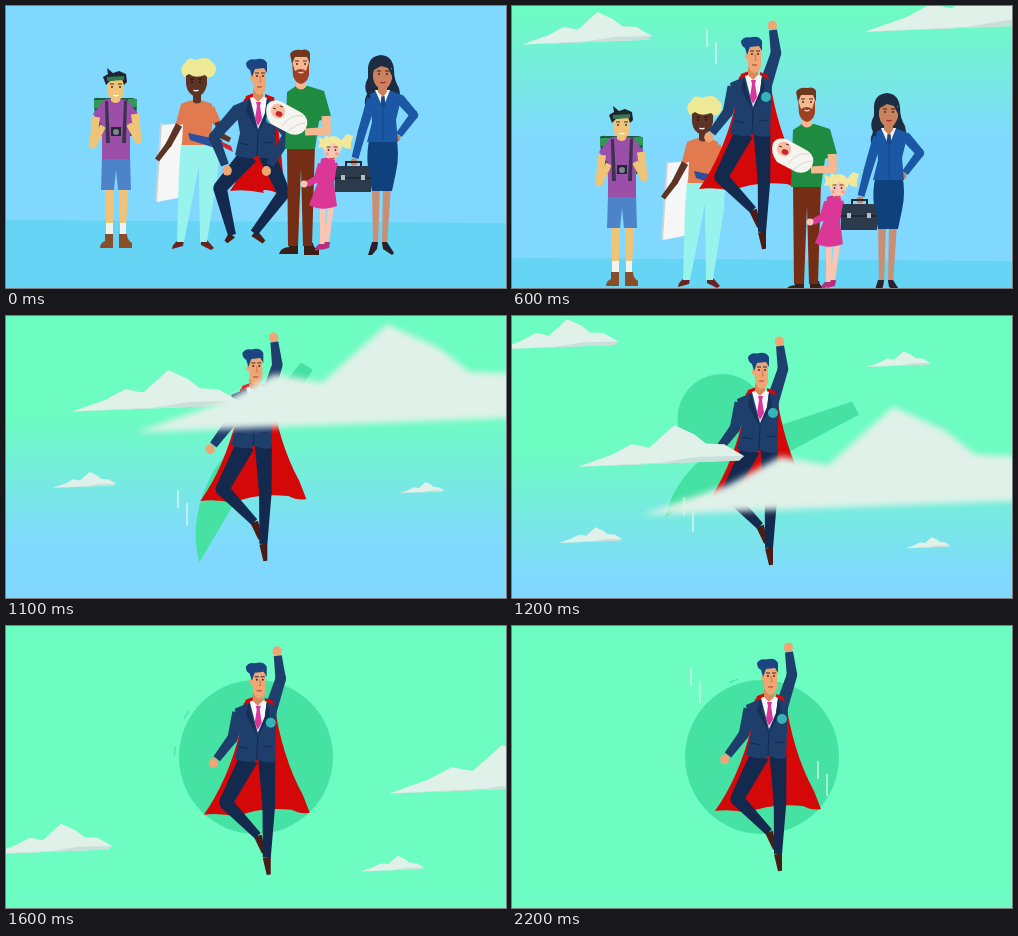
An HTML page with a canvas that plays this animation: 500 px wide and 282 px high, repeating every 2300 ms.

```html
<!DOCTYPE html>
<html lang="en">
<head>
<meta charset="utf-8">
<title>Flying hero</title>
<style>
html, body { margin: 0; width: 100%; height: 100%; overflow: hidden; background: #80d8ff; }
canvas { display: block; width: 500px; height: 282px; }
</style>
</head>
<body>
<canvas id="stage"></canvas>
<script>
const LOOP = 2300, STEP = 100, W = 500, H = 282;
const canvas = document.getElementById('stage');
const ratio = window.devicePixelRatio || 1;
canvas.width = W * ratio;
canvas.height = H * ratio;
const ctx = canvas.getContext('2d');

// ---- motion rules ----
const LAUNCH = 600, END = 2200;
const mix = (a, b, k) => a + (b - a) * k;
const mixPoint = (p, q, k) => [mix(p[0], q[0], k), mix(p[1], q[1], k)];
const clamp = k => Math.max(0, Math.min(1, k));
const smooth = k => (k = clamp(k), k * k * (3 - 2 * k));

// The flight starts fast and slows to a hover.
const climb = t => 735 * (1 - Math.pow((END - t) / (END - LAUNCH), 1.45));
const crowdDrop = t => 38 * Math.pow(t / LAUNCH, 4.7);
function skyTop(t) {
  const u = (t - LAUNCH) / 800;
  return 5 + 205 * Math.sign(u) * Math.pow(Math.abs(u), 1.6);
}

// ---- drawing helpers ----
function fill(color, d) {
  ctx.fillStyle = color;
  ctx.fill(new Path2D(d));
}
function line(color, width, d) {
  ctx.strokeStyle = color;
  ctx.lineWidth = width;
  ctx.stroke(new Path2D(d));
}
function oval(color, x, y, rx, ry = rx, turn = 0) {
  ctx.fillStyle = color;
  ctx.beginPath();
  ctx.ellipse(x, y, rx, ry, turn, 0, 7);
  ctx.fill();
}
const poly = (color, pts) => fill(color, 'M' + pts.map(p => p.join()).join('L') + 'Z');

// Limb through joints, its width tapering from start to end.
function limb(color, joints, from, to) {
  const last = joints.length - 1;
  const width = i => mix(from, to, i / last) / 2;
  for (let i = 0; i < last; i++) {
    const [x0, y0] = joints[i], [x1, y1] = joints[i + 1];
    const len = Math.hypot(x1 - x0, y1 - y0) || 1;
    const nx = (y0 - y1) / len, ny = (x1 - x0) / len;
    const a = width(i), b = width(i + 1);
    poly(color, [[x0 + nx * a, y0 + ny * a], [x1 + nx * b, y1 + ny * b],
      [x1 - nx * b, y1 - ny * b], [x0 - nx * a, y0 - ny * a]]);
    if (i + 1 < last) oval(color, x1, y1, b);
  }
}
function face(x, y, gap, ink, lips) {
  for (const eye of [x - gap, x + gap]) {
    oval(ink, eye, y, .9);
    line(ink, .9, `M${eye - 2} ${y - 3}h4`);
  }
  line(lips, 1.4, `M${x - 2.5} ${y + 8}q2.5 1.8 5 0`);
}

// ---- sky ----
function sky(t) {
  const y = skyTop(t);
  const g = ctx.createLinearGradient(0, y, 0, y + 130);
  g.addColorStop(0, '#6dfcc2');
  g.addColorStop(1, '#80d8ff');
  ctx.fillStyle = g;
  ctx.fillRect(0, 0, W, H);
}

const ridge = [[0, 1], [.2, .72], [.32, .46], [.43, .54], [.58, 0], [.7, .22], [.77, .44], [.88, .46], [1, .74], [.97, .85]];
const shade = [[0, 1], [.5, .9], [.72, .76], [1, .74], [.97, .85]];
// left, width, top at launch
const farClouds = [[10, 130, 6], [353, 203, -25], [47, 63, -152], [394, 44, -142],
  [-15, 121, -360], [355, 63, -328], [383, 195, -439]];
const nearCloud = [66, 166, -254];
const haze = [130, 433, -454];

function cloud([x, w, y], t, depth = 1) {
  const top = y + climb(t) * depth;
  const place = pts => pts.map(([u, v]) => [x + u * w, top + v * w / 4]);
  poly('#e0f1e9', place(ridge));
  if (depth === 1) poly('#cadfda', place(shade));
}

function streaks(x, y, born, t) {
  const age = t - born;
  if (age < 0 || age > 400) return;
  ctx.fillStyle = 'rgba(225,255,245,.8)';
  ctx.fillRect(x - .75, y + age * .07, 1.5, 18);
  ctx.fillRect(x + 8.25, y + 13 + age * .07, 1.5, 22);
}

// ---- green disc: a spinning segment that a circle grows over ----
function disc(t) {
  const green = '#46e2a4';
  if (t > 800 && t < 1600) {
    const a = 112 * Math.cos((t - 1100) / 500);
    const w = 28 + (t - 900) * .03;
    ctx.save();
    ctx.translate(250, 150);
    ctx.rotate((57 + (t - 900) * .317) * Math.PI / 180);
    fill(green, `M${-a} 0H${a}Q${a * .7} ${w} ${a * .2} ${w}L${-a} ${w * .4}Z`);
    ctx.restore();
  }
  const grow = clamp((t - 1100) / 300);
  oval(green, mix(190, 250, grow), mix(88, 131, grow), 77 * Math.sqrt(grow));
  if (t < 1500) return;
  ctx.strokeStyle = green;
  ctx.lineWidth = 1.2;
  const turn = 3.54 + (t - 1800) * .0019;
  for (const a of [turn, turn + .47]) {
    ctx.beginPath();
    ctx.arc(250, 131, 81.5, a, a + .11 * clamp((2200 - t) / 300 + (a === turn)));
    ctx.stroke();
  }
}

// ---- bystanders ----
function backpacker() {
  const skin = '#f0c478';
  fill('#1d5a44', 'M88 95Q87 91 93 92H126Q132 92 131 98L129 130H90Z');
  fill('#2f9a58', 'M88 94h10v8h-10zM122 93h9v8h-9z');
  fill(skin, 'M99 182h9l-1 40h-7zM113 182h9l-2 40h-6z');
  fill('#f4f4ee', 'M100 217h7v13h-7zM114 217h6v13h-6z');
  fill('#8a4f2a', 'M99 228h8v14h-13q0-5 5-7zM113 228h8q0 6 5 9v5h-13z');
  fill('#4d84c9', 'M96 150H124L125 184H112L110 164L108 184H95Z');
  fill('#9b4fa9', 'M98 94Q109 90 122 95L132 108L124 118V153H96V119L87 108Z');
  limb(skin, [[90, 111], [87, 139], [97, 120]], 8, 6);
  limb(skin, [[129, 108], [132, 134], [123, 118]], 8, 6);
  fill('#3c3150', 'M99 95h3l2 42h-4zM118 95h3l-1 42h-4z');
  fill('#222733', 'M105 121h10v9h-10z');
  oval('#7c8793', 110, 126, 3);
  fill(skin, 'M105 86h9v9q-4 4-9 0zM101 73H118V85Q117 94 110 95Q102 93 101 84Z');
  fill('#1f2430', 'M100 79L97 71L102 68L101 62L107 67L113 65L120 68L121 76L118 79L116 73L104 75Z');
  fill('#2f7a50', 'M101 71l17-1v4l-17 1z');
  face(110, 81, 4, '#222', '#fff');
}

function boardWoman() {
  const skin = '#5b3426';
  fill('#c9d4d8', 'M154 118l3-1l-3 77l-5 2z');
  fill('#f5f6f5', 'M156 119L187 116V189L151 196Z');
  fill('#6b2320', 'M172 234h6l-1 6-11 3q0-4 6-9zM195 234h6l7 8-3 2-10-5z');
  fill('#98f3ec', 'M175 136H213L212 165L201 236H194L193 160L178 236H171L173 165Z');
  fill('#e27a50', 'M175 98Q190 90 206 98L207 112L204 139H176L177 118L169 121Z');
  limb(skin, [[173, 119], [163, 138], [151, 154]], 7, 5);
  limb('#e27a50', [[204, 102], [211, 117]], 9, 8);
  limb(skin, [[211, 116], [216, 130], [224, 134]], 6, 5);
  fill('#2a4f9c', 'M182 127L196 130L216 134L218 141L206 141L184 134Z');
  fill('#d3262b', 'M214 135l11 5 2 6-8-4z');
  fill(skin, 'M187 86h8v10q-4 3-8 0zM180 68Q190 62 201 67V78Q199 90 190 91Q181 88 180 78Z');
  fill('#eee994', 'M178 71Q172 62 179 57Q182 50 190 54Q202 49 206 56Q213 61 208 69Q203 74 199 69Q189 73 183 68Z');
  face(190, 76, 4, '#1f100c', '#fff');
}

function father() {
  const skin = '#f4b990';
  fill('#3a1f18', 'M283 237h9v11h-19q1-6 10-7zM298 237h9q0 5 6 7v5h-15z');
  fill('#752d15', 'M281 138H309L306 240H297L295 162L292 240H282Z');
  fill('#1f8b40', 'M281 86L290 80H302L318 85L325 110L313 115L309 143H279Z');
  limb(skin, [[320, 110], [321, 125], [299, 126]], 9, 7);
  fill(skin, 'M290 72h10v9q-5 5-10 0zM287 51H303V67Q301 76 295 77Q288 75 287 66Z');
  fill('#9d4023', 'M286 56L289 65Q295 61 300 65L303 56V69Q301 77 295 78Q288 76 287 69Z');
  fill('#70371e', 'M286 58L284 48Q287 43 295 44Q302 42 304 47L304 58L301 51L289 51Z');
  face(295, 58, 4, '#332019', '#f7d5c0');
  fill('#f6f4ef', 'M261 99Q266 92 276 96L296 107Q304 113 300 122Q295 131 284 128L265 118Q258 109 261 99Z');
  line('#d3d6d5', 1, 'M276 120Q284 108 297 110M281 126Q291 117 300 117');
  oval('#f6bda0', 272, 105, 7, 7.5, -.4);
  oval('#c8242e', 273, 108, 3.5, 2.6, .4);
  line('#5a2a20', 1, 'M267 102l3 1M274 100l3 1');
}

function girl() {
  const skin = '#f8c6b3', hair = '#f5e79a', dress = '#da3796';
  fill(skin, 'M314 200h6l-1 40h-5zM322 200h6l-5 38h-5z');
  fill('#b52f7d', 'M313 238h6v4l-10 3q0-4 4-7zM319 236h5l-1 6-8 2z');
  fill(dress, 'M315 153Q321 150 329 154L328 178L331 200Q316 206 303 199L312 176Z');
  limb(dress, [[316, 158], [311, 173], [301, 178]], 8, 6);
  oval(skin, 298, 178, 3.5);
  limb(dress, [[328, 157], [331, 174]], 7, 6);
  fill(hair, 'M319 141L312 142L314 136L312 131L318 133L320 129L325 133ZM333 137L341 128L347 130L345 137L345 143L339 142Z');
  oval(hair, 327, 139, 9.5, 9);
  oval(skin, 326, 145, 8, 8.5);
  fill(hair, 'M317 144Q319 132 328 133Q335 134 336 142Q330 140 327 137Q323 142 317 144Z');
  oval('#f29c92', 321, 148, 1.8);
  oval('#f29c92', 331, 148, 1.8);
  face(326, 144, 3.5, '#4b2d25', '#c9404a');
}

function manager() {
  const skin = '#c8835e', coat = '#1a57a5', hair = '#1d2c40';
  fill(hair, 'M362 62Q363 50 375 49Q387 50 388 64Q388 74 393 82Q396 92 389 101L362 103Q356 98 361 88Q357 80 362 72Z');
  fill('#c98f74', 'M366 180h8l-2 60h-5zM377 180h8l-4 60h-5z');
  fill('#28202d', 'M366 236h6l-1 7-5 6h-4zM376 236h5l7 11-2 2-9-6z');
  fill('#0f427c', 'M364 130H390Q394 148 390 166L386 185H366L362 162Q360 146 364 130Z');
  limb(coat, [[393, 92], [408, 109], [393, 129]], 10, 7);
  oval(skin, 391, 132, 3.5);
  fill(coat, 'M364 88L372 84H383L396 89L390 114L392 136H361L366 116Z');
  limb(coat, [[366, 93], [356, 126], [349, 152]], 10, 7);
  oval(skin, 348, 156, 3.5);
  fill('#f4f5f5', 'M369 84h15l-7 18z');
  fill('#17488a', 'M375.5 90h3l1 9-2.500 4-2.500-4z');
  line('#154883', 1, 'M377 103V134');
  fill(skin, 'M372 78h9v8l-4 5-5-5zM367 62Q376 56 386 62V73Q383 83 377 84Q369 82 367 72Z');
  fill(hair, 'M365 74Q364 55 375 54Q386 54 387 72L382 62L375 60L368 64Z');
  face(377, 68, 4, '#2b1a18', '#b51f2b');
  line('#202b37', 2, 'M340 161v-5h15v5');
  fill('#2b3b4b', 'M331 160H363Q366 173 365 186H329Q328 172 331 160Z');
  fill('#1f2a37', 'M329 171h36v2h-36z');
  fill('#b6bec2', 'M335 169h4v5h-4zM355 169h4v5h-4z');
}

// ---- hero ----
const crouching = {
  elbowL: [206, 116], handL: [217, 144], elbowR: [280, 114], handR: [262, 144],
  kneeL: [212, 167], footL: [224, 214], toeL: [218, 221],
  kneeR: [276, 172], footR: [246, 212], toeR: [256, 221],
  capeL: [222, 170], capeR: [282, 173]
};
const flying = {
  elbowL: [225, 113], handL: [209, 134], elbowR: [273, 54], handR: [270, 31],
  kneeL: [218, 178], footL: [250, 211], toeL: [256, 228],
  kneeR: [261, 182], footR: [259, 233], toeR: [261, 250],
  capeL: [196, 190], capeR: [302, 188]
};
const drift = [[0, 2, 15], [200, 2, 16], [600, -9, -7], [900, -1, -13], [1200, -2, -1], [1400, 0, 0], [2200, 7, -5]];

function heroAt(t) {
  const i = drift.findIndex(([time]) => t <= time) || 1;
  const [t0, ...from] = drift[i - 1], [t1, ...to] = drift[i];
  return mixPoint(from, to, (t - t0) / (t1 - t0));
}

function hero(t) {
  const suit = '#1e3e6b', trousers = '#14294e', skin = '#f0a574', shoe = '#4a1c16', red = '#d40809';
  const rise = smooth((t - 200) / 350);
  const p = {};
  for (const name in flying) p[name] = mixPoint(crouching[name], flying[name], rise);
  const arm = (shoulder, elbow, hand) => {
    const [x, y] = mixPoint(elbow, hand, 1.2);
    oval(skin, x, y, 4.6, 5);
    limb(suit, [shoulder, elbow, hand], 13, 8);
  };
  ctx.save();
  ctx.translate(...heroAt(t));

  const [lx, ly] = p.capeL, [rx, ry] = p.capeR;
  fill(red, `M236 78L266 76Q274 132 ${rx - 7} ${ry - 18}L${rx} ${ry}Q${rx - 8} ${ry + 2} ${rx - 18} ${ry - 3}` +
    `Q${(lx + rx) / 2} ${ry - 6} ${lx + 34} ${ly + 2}Q${lx + 16} ${ly - 2} ${lx} ${ly}Q${lx + 24} ${ly - 34} 232 108Z`);

  limb(shoe, [p.footL, p.toeL], 8, 4);
  limb(shoe, [p.footR, p.toeR], 8, 4);
  limb(trousers, [[241, 134], p.kneeL, p.footL], 19, 8);
  limb(trousers, [[259, 134], p.kneeR, p.footR], 17, 8);
  arm([231, 88], p.elbowL, p.handL);
  arm([262, 88], p.elbowR, p.handR);

  fill(red, 'M235 84L238 75L246 72L241 90ZM257 73L265 76L266 84L258 90Z');
  fill(suit, 'M227 84L241 78L259 77L269 83L268 110L267 137Q258 139 250 135Q240 140 227 134L232 112Z');
  fill('#f5f6f8', 'M242 77L250 74L259 77L257 92L250 108Z');
  fill('#d9369c', 'M248 81h5l-1 4 2 13-4 7-3-7 2-13z');
  fill('#172f56', 'M241 78L238 90L250 112L244 92ZM259 77L262 90L250 112L257 93Z');
  line('#132848', .9, 'M250 111L249 135M232 122l9 2M256 122l9-1');
  oval('#35b4b8', 263, 98, 5);

  fill('#d88a5b', 'M245 68h10v8l-5 5-5-5z');
  fill(skin, 'M244 47H258V66Q257 73 251 74Q246 72 245 65Z');
  oval(skin, 244, 57, 2, 3);
  fill('#1b4580', 'M244 56L242 49Q238 47 238 42Q241 37 247 38.500Q256 36 259 42L259 52L256 47L247 48Z');
  line('#24303f', 1.2, 'M247 52h4M253 52h4');
  oval('#24222a', 249, 55, .9);
  oval('#24222a', 255, 55, .9);
  line('#c87a4f', 1, 'M252 55l1 6h-2');
  line('#a34b38', 1.1, 'M249 66h5');
  ctx.restore();
}

function draw(t) {
  ctx.setTransform(ratio, 0, 0, ratio, 0, 0);
  const crowd = (...people) => {
    ctx.save();
    ctx.translate(0, crowdDrop(t));
    people.forEach(person => person());
    ctx.restore();
  };
  sky(t);
  crowd(() => fill('#66d4f5', 'M0 214L500 217V400H0Z'));
  farClouds.forEach(c => cloud(c, t));
  disc(t);
  streaks(195, 23, 600, t);
  streaks(172, 160, 900, t);
  streaks(179, 14, 1800, t);
  streaks(306, 128, 2100, t);
  crowd(backpacker, boardWoman);
  hero(t);
  crowd(father, girl, manager);
  cloud(nearCloud, t);
  ctx.filter = `blur(${3 * ratio}px)`;
  cloud(haze, t, 1.5);
  ctx.filter = 'none';
}

const start = performance.now();
let shown = -1;
function tick() {
  const t = Math.floor((performance.now() - start) % LOOP / STEP) * STEP;
  if (t !== shown) draw(shown = t);
  requestAnimationFrame(tick);
}
tick();
</script>
</body>
</html>
```
